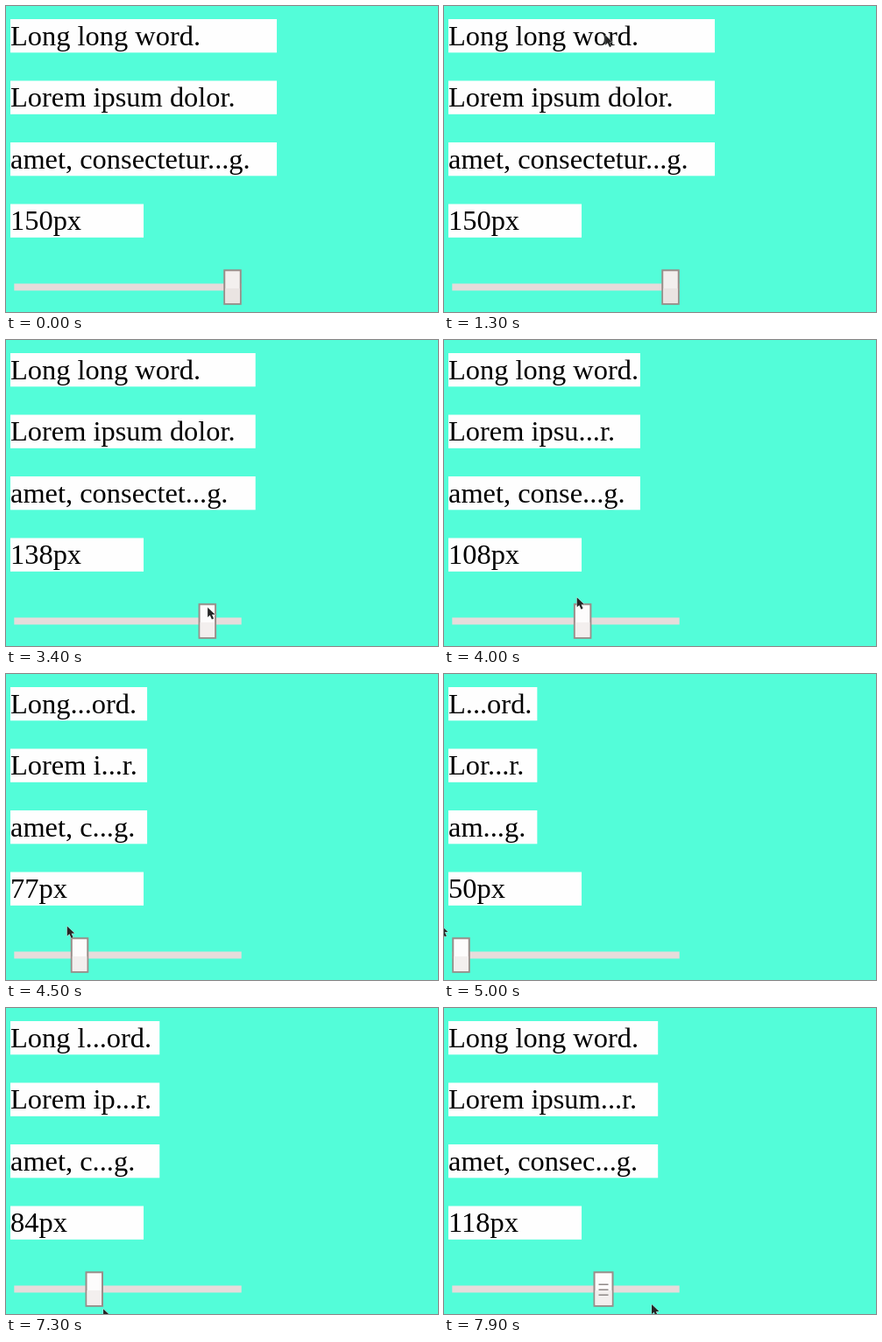
Write an HTML page with a canvas that moves like this. It is 493 by 350 pixels and loops after 8000 ms.

```html
<!DOCTYPE html>
<html lang="en">
<head>
<meta charset="utf-8">
<title>Middle ellipsis slider</title>
<style>
  html, body { margin: 0; width: 100%; height: 100%; overflow: hidden; background: #53fdd9; }
  canvas { display: block; }
</style>
</head>
<body>
<canvas id="stage" width="493" height="350"></canvas>
<script>
const ctx = document.getElementById('stage').getContext('2d');
const LOOP = 8000, STEP = 100;
const ZOOM = 2.027;
const LEFT = 5, TOP = 15, PITCH = 70.5, ROW_H = 38.3;
const FONT = `${16 * ZOOM}px "Liberation Serif", "Times New Roman", serif`;

// reserve + grow * width is the room kept for the dots and the tail
const lines = [
  { text: 'Long long word.', tail: 'ord.', reserve: 38, grow: 0 },
  { text: 'Lorem ipsum dolor.', tail: 'r.', reserve: 23, grow: 0 },
  { text: 'amet, consectetur adipiscing.', tail: 'g.', reserve: 22.3, grow: 0.0905 }
];

const ramp = (t, from, to, power = 1) =>
  Math.min(1, Math.max(0, (t - from) / (to - from))) ** power;
const mix = (a, b, p) => a + (b - a) * p;

// Three drags: far left, a nudge, then back to the right
function valueAt(t) {
  return Math.round(150 - 100 * ramp(t, 3000, 4900, 1.35)
    + 4 * ramp(t, 6000, 6300) + 64 * ramp(t, 6600, 7900, 1.22));
}

function pointerAt(t) {
  if (t < 1900) {
    const u = ramp(t, 100, 1900), a = 0.8 + 4 * Math.PI * u, r = Math.sqrt(1 - u);
    return [163 + 150 * r * Math.sin(a), 137 + 185 * r * Math.cos(a)];
  }
  if (t < 3000) {
    const u = ramp(t, 1900, 2500);
    return [mix(163, 261, u), mix(137, 315, u)];
  }
  if (t < 5200) {
    const u = ramp(t, 3000, 4900);
    return [mix(261, -4, u ** 1.38), mix(315, 287, Math.sin(u * Math.PI / 2))];
  }
  if (t < 6600) {
    const u = ramp(t, 5200, 6300);
    return [mix(-4, 32, u), mix(287, 333, u)];
  }
  const u = ramp(t, 6600, 7900);
  return [mix(32, 237, u ** 1.54), mix(333, 339, u) + 8 * Math.sin(u * Math.PI)];
}

function rect(x, y, w, h, color) {
  ctx.fillStyle = color;
  ctx.fillRect(x, y, w, h);
}

const widthOf = s => ctx.measureText(s).width / ZOOM;

function shorten({ text, tail, reserve, grow }, width) {
  if (widthOf(text) <= width) return text;
  const room = width - reserve - grow * width;
  let n = 1;
  while (n < text.length && widthOf(text.slice(0, n + 1)) <= room) n++;
  return text.slice(0, n).trimEnd() + '...' + tail;
}

function row(i, width, text) {
  const y = TOP + i * PITCH;
  rect(LEFT, y, width * ZOOM, ROW_H, '#fefefe');
  ctx.fillStyle = '#000';
  ctx.fillText(text, LEFT, Math.floor(y + 30));
}

function slider(value, t) {
  rect(9.3, 317.5, 259.4, 8, '#e6dcdb');
  const grip = (t >= 6300 && t < 6700) || t >= 7800;
  const hover = t >= 2400;
  const w = grip ? 23 : 20.5, y = 301.3, h = 40.5;
  const x = 19.5 + (value - 50) * 2.39 - w / 2;
  rect(x, y, w, h, '#9a8d89');
  rect(x + 2, y + 2, w - 4, h - 4, hover ? '#fdfcfc' : '#f3efee');
  rect(x + 2, 323, w - 4, y + h - 325, hover ? '#f3efee' : '#eae4e2');
  if (grip) {
    for (let i = 0; i < 3; i++) rect(x + 6, 315.5 + i * 6, w - 12, 1.5, '#8f8988');
  }
}

function arrow(x, y) {
  ctx.save();
  ctx.translate(x, y);
  ctx.scale(0.8, 0.8);
  const shape = new Path2D('M0 0V14L3.3 11 6 17 8.6 15.8 6 10.2 10.5 10Z');
  ctx.strokeStyle = '#e8f0ee';
  ctx.stroke(shape);
  ctx.fillStyle = '#262626';
  ctx.fill(shape);
  ctx.restore();
}

function draw(t) {
  const value = valueAt(t);
  rect(0, 0, 493, 350, '#53fdd9');
  ctx.font = FONT;
  lines.forEach((line, i) => row(i, value, shorten(line, value)));
  row(3, 75, value + 'px');
  slider(value, t);
  if (t >= 100) arrow(...pointerAt(t));
}

const start = performance.now();
function tick() {
  const t = (performance.now() - start) % LOOP;
  draw(Math.floor(t / STEP) * STEP);
  requestAnimationFrame(tick);
}
tick();
</script>
</body>
</html>
```
